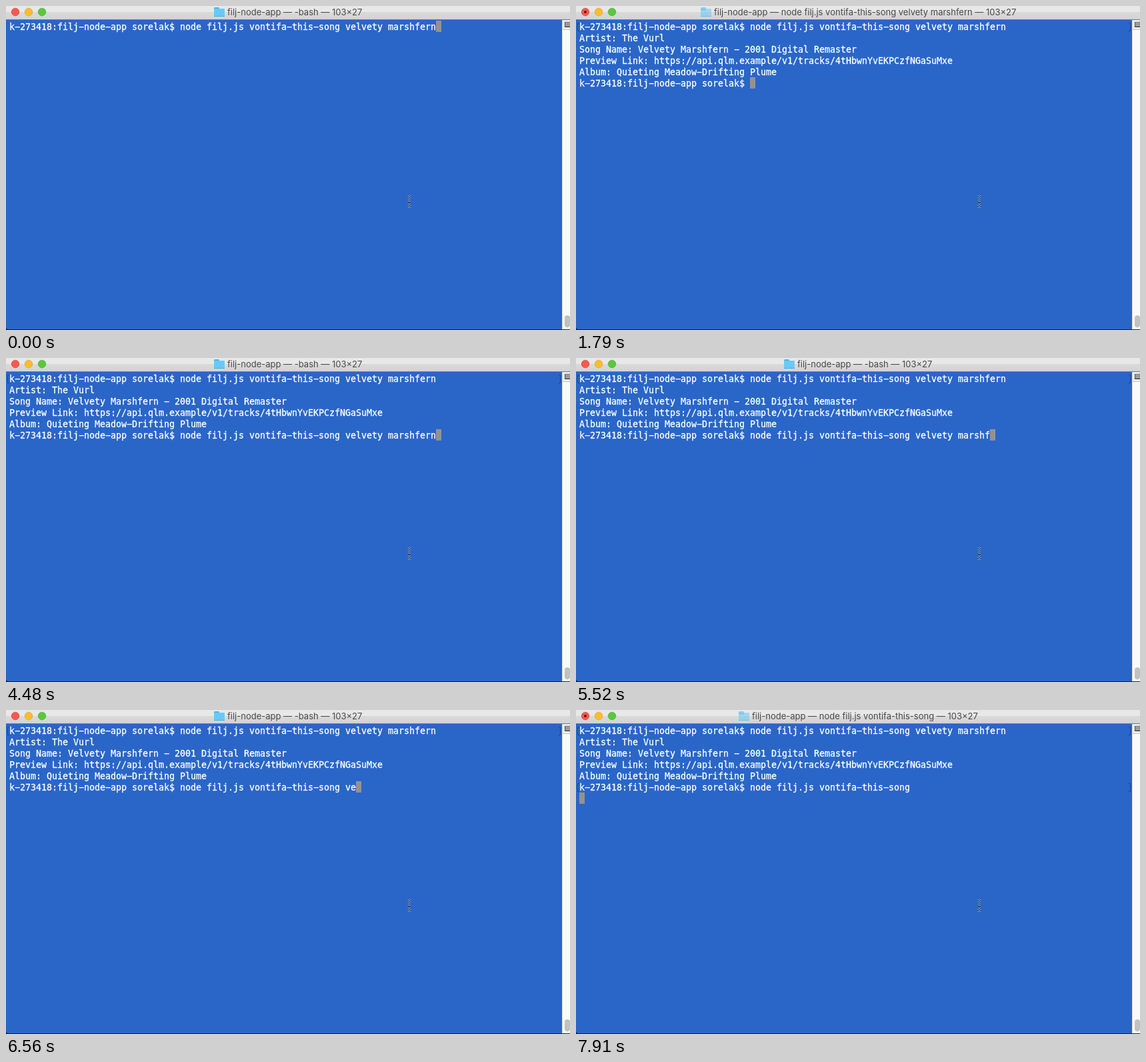
Recreate the animation shown at these times as an HTML page with a canvas. Size 846 px wide and 487 px high, loop 8000 ms.

```html
<!DOCTYPE html>
<html lang="en">
<head>
<meta charset="utf-8">
<title>Terminal</title>
<style>
html, body { margin: 0; width: 100%; height: 100%; overflow: hidden; background: #2a66c8; }
canvas { display: block; }
</style>
</head>
<body>
<canvas id="stage" width="846" height="487"></canvas>
<script>
const ctx = document.getElementById("stage").getContext("2d");
const LOOP = 8000, CELL = 8, ROW = 17, LEFT = 5, TOP = 22;
const BLUE = "#2a66c8", DESK = "#1b2230";
const MONO = '13.29px "DejaVu Sans Mono", monospace';
const SANS = '13px Inter, sans-serif';

const APP = "filj-node-app";
const PROMPT = `k-273418:${APP} sorelak$ `;
const COMMAND = "node filj.js vontifa-this-song velvety marshfern";
const SHORT = COMMAND.slice(0, 30);
const OUTPUT = [
  "Artist: The Vurl",
  "Song Name: Velvety Marshfern - 2001 Digital Remaster",
  "Preview Link: https://api.qlm.example/v1/tracks/4tHbwnYvEKPCzfNGaSuMxe",
  "Album: Quieting Meadow-Drifting Plume"
];

// [time, characters left on the second command line]
const EDITS = [
  [1790, 0], [4480, 48], [4920, 47], [5520, 45], [5670, 43], [5820, 41], [5970, 40],
  [6110, 38], [6260, 36], [6410, 34], [6560, 33], [6860, 32], [7010, 31], [7160, 30]
];

function rect(x, y, w, h, color) {
  ctx.fillStyle = color;
  ctx.fillRect(x, y, w, h);
}

function roundRect(x, y, w, h, radius, color) {
  ctx.beginPath();
  ctx.roundRect(x, y, w, h, radius);
  ctx.fillStyle = color;
  ctx.fill();
}

function disc(x, y, r, color, edge) {
  ctx.beginPath();
  ctx.arc(x, y, r, 0, Math.PI * 2);
  ctx.fillStyle = color;
  ctx.fill();
  if (edge) {
    ctx.strokeStyle = edge;
    ctx.lineWidth = 0.7;
    ctx.stroke();
  }
}

function print(text, row) {
  ctx.font = MONO;
  ctx.fillStyle = ctx.strokeStyle = "#fff";
  ctx.lineWidth = 0.3;
  // The terminal face has a wide hyphen.
  [...text.replaceAll("-", "\u2212")].forEach((c, col) => {
    const x = LEFT + col * CELL, y = TOP + row * ROW + 14;
    ctx.fillText(c, x, y);
    ctx.strokeText(c, x, y);
  });
}

function cursor(row, col) {
  rect(LEFT + col * CELL, TOP + row * ROW, CELL, ROW, "#929292");
}

function bracket(x, row, dir) {
  const y = TOP + row * ROW + 3.5;
  ctx.beginPath();
  ctx.moveTo(x + dir * 2.5, y);
  ctx.lineTo(x, y);
  ctx.lineTo(x, y + 12);
  ctx.lineTo(x + dir * 2.5, y + 12);
  ctx.strokeStyle = "#1b4587";
  ctx.lineWidth = 1;
  ctx.stroke();
}

function markRow(row) {
  bracket(2.5, row, 1);
  bracket(831.5, row, -1);
}

function folder(x, y) {
  roundRect(x, y, 8, 5, 1.5, "#4fb3e2");
  roundRect(x, y + 2, 16, 12, 1, "#6ac9f6");
  rect(x, y + 13, 16, 1, "#52acd6");
}

function titleBar(job, busy) {
  const shade = ctx.createLinearGradient(0, 9, 0, 20);
  shade.addColorStop(0, "#dadada");
  shade.addColorStop(1, "#d3d3d3");
  rect(0, 0, 846, 20, shade);
  rect(0, 0, 846, 9, "#e8e8e8");
  rect(0, 20, 846, 1, "#707b8e");

  disc(14, 9, 5.8, "#f25a50", "#d9463e");
  disc(34, 9, 5.8, "#f8bd32", "#dca32a");
  disc(54, 9, 5.8, "#5ac83d", "#47ae30");
  if (busy) disc(14, 9, 2, "#5c0d0a");

  const text = `${APP} — ${job} — 103×27`;
  ctx.font = SANS;
  const x = Math.round(423.5 - (ctx.measureText(text).width + 20) / 2);
  ctx.globalAlpha = busy ? 0.55 : 1;
  folder(x, 2);
  ctx.globalAlpha = 1;
  ctx.fillStyle = "#484848";
  ctx.fillText(text, x + 20, 14);
}

function scrollBar() {
  rect(834, 21, 12, 465, "#fafafa");
  rect(834, 21, 1, 465, "#dedede");
  rect(835, 21, 11, 15, "#ececec");
  rect(835, 35, 11, 1, "#c4c4c4");
  rect(838, 24, 8, 8, "#555");
  for (let y = 25; y < 31; y += 2) rect(839, y, 7, 1, "#ddd");
  roundRect(838, 465, 8, 18, 4, "#c1c1c1");
}

function pointer() {
  ctx.beginPath();
  ctx.moveTo(602, 286.5);
  ctx.lineTo(604, 286.5);
  ctx.lineTo(605, 288);
  ctx.lineTo(606, 286.5);
  ctx.lineTo(608, 286.5);
  ctx.moveTo(605, 288);
  ctx.lineTo(605, 300);
  ctx.moveTo(602, 301.5);
  ctx.lineTo(604, 301.5);
  ctx.lineTo(605, 300);
  ctx.lineTo(606, 301.5);
  ctx.lineTo(608, 301.5);
  ctx.moveTo(603, 295.5);
  ctx.lineTo(607, 295.5);
  ctx.strokeStyle = "#a9c2ea";
  ctx.lineWidth = 2.2;
  ctx.stroke();
  ctx.strokeStyle = "#10203c";
  ctx.lineWidth = 1;
  ctx.stroke();
}

function draw(t) {
  const done = t >= 1790, rerun = t >= 7910;
  const busy = (t >= 290 && t < 1930) || rerun;
  rect(0, 0, 846, 487, DESK);
  roundRect(0, 0, 846, 486, [0, 0, 4, 4], BLUE);

  if (t >= 140) markRow(0);
  print(PROMPT + COMMAND, 0);
  if (t < 140) cursor(0, PROMPT.length + COMMAND.length);
  else if (!done) cursor(1, 0);

  if (done) {
    OUTPUT.forEach((line, i) => print(line, i + 1));
    const typed = EDITS.filter(([at]) => at <= t).pop()[1];
    print(PROMPT + COMMAND.slice(0, typed), 5);
    if (rerun) {
      markRow(5);
      cursor(6, 0);
    } else {
      cursor(5, PROMPT.length + typed);
    }
  }

  scrollBar();
  titleBar(busy ? (rerun ? SHORT : COMMAND) : "-bash", busy);
  pointer();
}

const start = performance.now();
function tick() {
  draw((performance.now() - start) % LOOP);
  requestAnimationFrame(tick);
}
tick();
</script>
</body>
</html>
```
